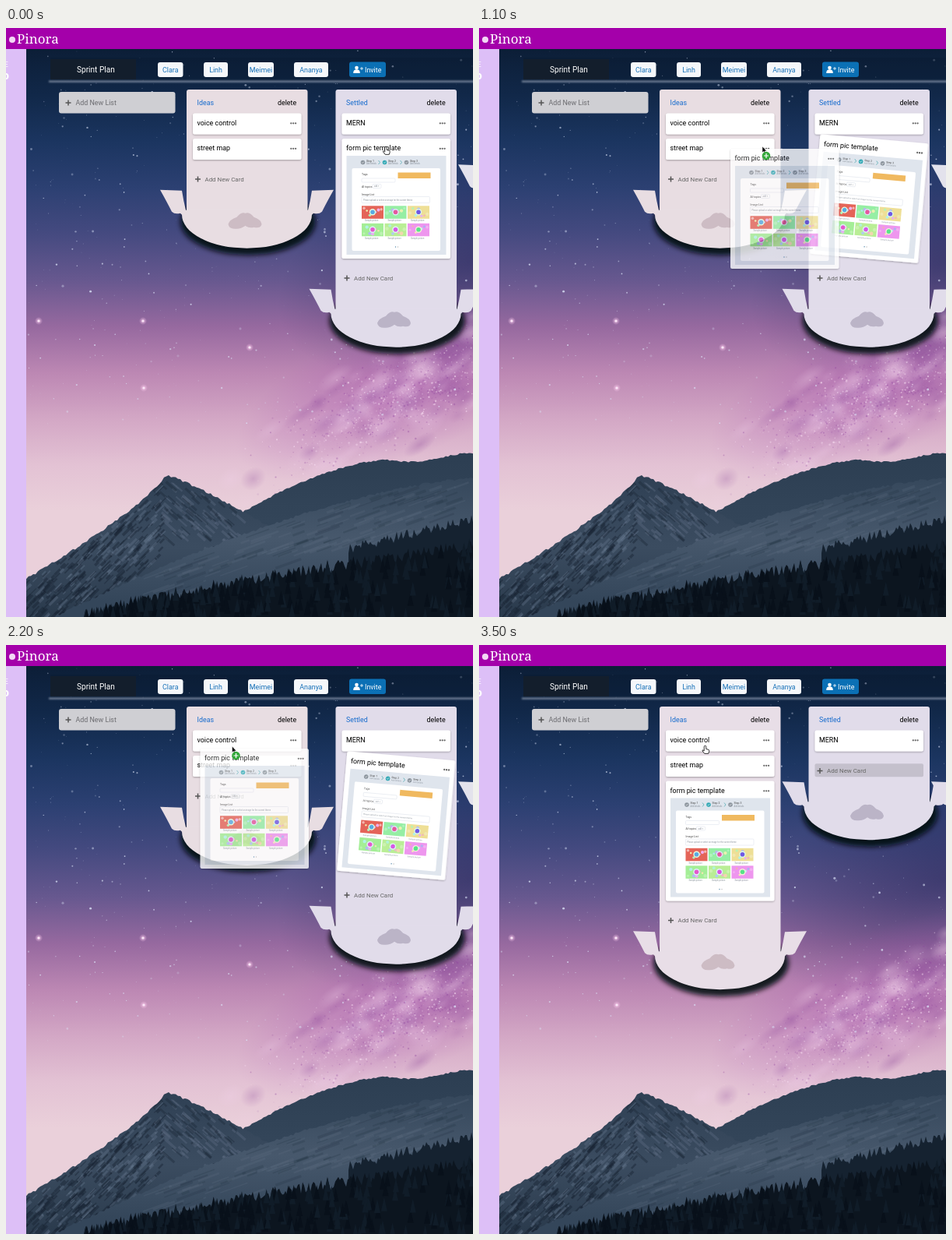
Animation of 600 by 756 pixels, one loop 3700 ms. Source, as an HTML page with a canvas:

```html
<!DOCTYPE html>
<html lang="en">
<head>
<meta charset="utf-8">
<title>Sprint board</title>
<style>
html, body { margin: 0; width: 600px; height: 756px; overflow: hidden; }
canvas, svg { position: absolute; left: 0; top: 0; }
text { font: 8.9px Roboto, Arial, sans-serif; }
.tiny { font-size: 2.6px; fill: #8a929c; }
.label { font-size: 3.5px; fill: #444; }
.add { font-size: 7.9px; fill: #666; }
.name { fill: #1670b8; text-anchor: middle; }
.light { fill: #fff; }
</style>
</head>
<body>
<canvas id="sky" width="600" height="756"></canvas>
<svg id="ui" width="600" height="756"></svg>
<script>
const c = document.getElementById('sky').getContext('2d');
const ui = document.getElementById('ui');

let seed = 11;
const rnd = () => (seed = seed * 16807 % 2147483647) / 2147483647;
const spread = () => rnd() + rnd() + rnd() - 1.5;
const repeat = (n, f) => { for (let i = 0; i < n; i++) f(i); };

function fade(y0, y1, ...colors) {
  const g = c.createLinearGradient(0, y0, 0, y1);
  colors.forEach((color, i) => g.addColorStop(i / (colors.length - 1), color));
  return g;
}

function glow(x, y, rx, ry, rgb, alpha, turn = 0) {
  c.save();
  c.translate(x, y);
  c.rotate(turn);
  c.scale(rx, ry);
  const g = c.createRadialGradient(0, 0, 0, 0, 0, 1);
  g.addColorStop(0, `rgba(${rgb},${alpha})`);
  g.addColorStop(1, `rgba(${rgb},0)`);
  c.fillStyle = g;
  c.fillRect(-1, -1, 2, 2);
  c.restore();
}

function dot(x, y, r, color) {
  c.fillStyle = color;
  c.beginPath();
  c.arc(x, y, r, 0, 7);
  c.fill();
}

function paintSky() {
  c.fillStyle = fade(27, 620, '#0c1e37', '#112849', '#1b3560', '#2c4072', '#454a80',
    '#67588f', '#96699f', '#bc87b3', '#d3a7c5', '#e3c2d4', '#ead0da');
  c.fillRect(0, 0, 600, 756);
  glow(600, 300, 260, 140, '34,36,86', .5, -.3);
  glow(510, 460, 230, 90, '170,88,178', .5, -.4);

  // Milky way: overlapping puffs, then grains, along one slanted band
  const band = () => {
    const along = spread() * 160;
    return [520 + along, 465 - along * .45 + spread() * 60];
  };
  repeat(130, i => glow(...band(), 10 + rnd() * 26, 6 + rnd() * 12, i % 3 ? '240,208,232' : '138,68,152', .12 + rnd() * .2, -.6));
  repeat(1300, i => dot(...band(), .4 + rnd() * .9, i % 2 ? `rgba(252,228,246,${rnd() * .6})` : `rgba(142,66,158,${rnd() * .4})`));

  repeat(520, () => dot(26 + rnd() * 574, 28 + rnd() * 480, .3 + rnd() ** 3 * 1.3, `rgba(220,228,248,${.2 + rnd() * .6})`));
  [[42, 376], [176, 376], [177, 462], [313, 410]].forEach(([x, y]) => {
    glow(x, y, 5, 5, '255,205,240', .8);
    dot(x, y, 1.6, '#fbe6f8');
  });
}

const peak = x => 574 + (x < 205 ? 133 * ((205 - x) / 179) ** .8 : 46 * ((x - 205) / 98) ** 1.2);
const range = x => 554 + 68 * (Math.max(0, 490 - x) / 187) ** 1.6 - Math.max(0, x - 490) * .04 + (x > 490 ? 4 * Math.sin((x - 490) / 22) : 0);
const slope = x => 578 + 112 * ((600 - x) / 395) ** 1.5;
const grove = x => 668 - 38 * ((x - 440) / 160);
const forest = x => 760 - 96 * ((x - 95) / 505) ** .75;

function ridge(f, from, jag, fill, step = 3) {
  c.fillStyle = fill;
  c.beginPath();
  c.moveTo(from, 756);
  for (let x = from; x < 603; x += step) c.lineTo(x, f(x) - (rnd() - .5) * jag);
  c.lineTo(603, 756);
  c.fill();
}

// Short streaks running downhill, as rock and snow
function streaks(n, f, x0, x1, depth, lean, color) {
  repeat(n, () => {
    const x = x0 + rnd() * (x1 - x0), y = f(x) + 3 + rnd() * depth, len = 4 + rnd() * 13;
    c.strokeStyle = color(x);
    c.lineWidth = 1 + rnd() * 3;
    c.beginPath();
    c.moveTo(x, y);
    c.lineTo(x + lean(x) * len, y + len * .8);
    c.stroke();
  });
}

function paintLand() {
  ridge(range, 295, 2, fade(545, 720, '#2c3e52', '#334559', '#27384a'));
  ridge(peak, 26, 3, fade(574, 756, '#2f4054', '#3b4c60', '#2a3a4c'));
  streaks(420, peak, 26, 205, 90, () => -.8, () => rnd() < .65 ? 'rgba(24,36,52,.45)' : 'rgba(104,120,142,.35)');
  streaks(130, peak, 195, 300, 70, () => .9, () => rnd() < .5 ? 'rgba(28,40,56,.4)' : 'rgba(96,112,134,.35)');
  ridge(slope, 60, 3, fade(575, 735, '#35475b', '#47586c', '#34465a'));
  streaks(160, slope, 200, 600, 60, () => -2.2, () => rnd() < .5 ? 'rgba(34,48,64,.22)' : 'rgba(100,116,136,.2)');
  ridge(grove, 440, 14, '#152230', 2);
  ridge(forest, 95, 16, '#0c151f', 2);
  repeat(240, i => {
    const x = 100 + rnd() * 500, y = forest(x) + rnd() * (756 - forest(x));
    c.fillStyle = i % 2 ? '#101c28' : '#08101a';
    c.beginPath();
    c.moveTo(x, y - 10);
    c.lineTo(x + 4, y + 8);
    c.lineTo(x - 4, y + 8);
    c.fill();
  });
}

const text = (x, y, s, attrs = '') => `<text x="${x}" y="${y}" ${attrs}>${s}</text>`;
const rect = (x, y, w, h, fill, attrs = '') => `<rect x="${x}" y="${y}" width="${w}" height="${h}" fill="${fill}" ${attrs}/>`;
const circle = (x, y, r, fill) => `<circle cx="${x}" cy="${y}" r="${r}" fill="${fill}"/>`;
const at = (x, y, body) => `<g transform="translate(${x} ${y})">${body}</g>`;
const plus = (x, y) => `<path d="M${x} ${y}h7m-3.5-3.5v7" stroke="#555" stroke-width="1.5"/>`;

function tile(hue, i) {
  const tone = (turn, light) => `hsl(${hue + turn} 72% ${light}%)`;
  let art = rect(0, 0, 28, 16.5, tone(0, hue < 20 ? 62 : 76));
  repeat(7, k => art += circle(3 + k * 3.7, 3 + rnd() * 10.5, 1.2 + rnd() * 1.2, tone(k * 60, 82)));
  art += circle(14, 8, 4.2, tone(90, 92)) + circle(14, 8, 2.8, tone(200, 62));
  return at(25.5 + i % 3 * 29.5, 86.3 + Math.floor(i / 3) * 22.5, art + text(4, 20, 'Sample picture', 'class="tiny"'));
}

function form() {
  const step = i => at(27 + i * 28, 30.5, circle(0, 0, 2.8, i === 1 ? '#35a9b5' : '#8c959e') +
    '<path d="M-1.3 0l1 1 1.7-2" fill="none" stroke="#fff" stroke-width=".6"/>' +
    text(4.5, -.7, 'Step ' + (i + 1), 'class="label"') + text(4.5, 2.5, 'Add details', 'class="tiny"') +
    (i < 2 ? '<path d="M20-2.5l2 2.5-2 2.5" fill="none" stroke="#57adb5" stroke-width=".8"/>' : ''));
  const label = (y, s) => text(25.5, y, s, 'class="label"');
  const field = (x, y, w, h, s) => rect(x, y, w, h, '#fff', 'stroke="#d8dfe8" stroke-width=".5" rx="1"') + text(x + 2, y + h / 2 + 1, s, 'class="tiny"');
  return rect(6, 22, 128, 127, '#dfe5ed') + [0, 1, 2].map(step).join('') +
    rect(13, 38, 113.5, 106, '#fff', 'rx="2"') + rect(72, 43.5, 42, 7.5, '#f0b95f') +
    label(47, 'Tags') + label(62.5, 'AI topics') + label(72.5, 'Image List') +
    field(25.5, 51, 43, 5, '') + field(39.5, 58.5, 11, 5, 'add +') +
    field(25.5, 74.5, 87.5, 8, 'Please upload or select an image for the current theme') +
    [5, 130, 50, 110, 95, 300].map(tile).join('') + circle(69, 139, .7, '#58a') + circle(72, 139, .7, '#bbb');
}

const SHORT = 27, TALL = 154, GAP = 5.5;

function card(title, pic) {
  return rect(0, 0, 139.5, pic ? TALL : SHORT, '#fff', 'rx="2.5" filter="url(#lift)"') + text(5.5, 15, title) +
    [0, 1, 2].map(i => circle(126.3 + i * 2.9, 12.8, 1.15, '#666')).join('') + (pic ? form() : '');
}

const picCard = card('form pic template', true);
const beard = 'M-22 14Q-20 8-11 5Q-5-2 0 0Q5-2 11 5Q20 8 21 14Q20 20 11 18Q5 20 0 16Q-5 20-11 20Q-21 21-22 14Z';
const hull = 'M-34 0L-6 1Q-4 14-1 26H156Q159 14 161 1L189 0Q180 16 174 28Q170 32 163 30L161 32A83.5 43 0 0 1-6 32L-8 30Q-15 32-19 28Q-25 16-34 0Z';

// items: [height, svg] of each card
function list(x, title, items, fill, mark, hover) {
  let y = 109.5, cards = '';
  for (const [h, body] of items) {
    cards += at(8, y, body);
    y += h + GAP;
  }
  const w = y + 33.2;
  return at(x, 0,
    at(0, w, '<ellipse cx="79" cy="41" rx="87" ry="43" fill="#05070f" opacity=".88" filter="url(#blur)"/>') +
    rect(0, 79, 155.5, w - 45, fill, 'rx="3"') +
    at(0, w, `<path d="${hull}" fill="${fill}"/>`) + at(75.5, w + 30, `<path d="${beard}" fill="${mark}"/>`) +
    text(13.5, 99, title, 'fill="#176ccd"') + text(117, 98.5, 'delete') +
    (hover ? rect(8, w - 23, 139.5, 17, '#000', 'opacity=".13" rx="2"') : '') +
    plus(11, w - 13.8) + text(23.5, w - 11, 'Add New Card', 'class="add"') + cards);
}

function board(state) {
  const plain = s => [SHORT, card(s)];
  const pic = [TALL, state === 'tilt' ? `<g transform="rotate(5 69.75 77)">${picCard}</g>` : picCard];
  const done = state === 'done';
  const ideas = [plain('voice control'), plain('street map')], settled = [plain('MERN')];
  (done ? ideas : settled).push(pic);
  return `<g id="${state}">` + list(615, '', [plain('')], '#e3e2ec', '#bbb') +
    list(232, 'Ideas', ideas, done ? '#e8dee7' : '#e8dde2', '#cdbcc4') +
    list(423.5, 'Settled', settled, '#e1dcea', '#bbb4c7', done) + '</g>';
}

function chrome() {
  const person = (name, x, w) => rect(x, 44, w, 19, '#f5f7fa', 'rx="3"') + text(x + w / 2, 56.5, name, 'class="name"');
  return rect(0, 27, 26, 729, '#ddbff7') + rect(0, 0, 600, 27, '#a400aa') + circle(8, 15, 4, '#f3d8f5') +
    text(14, 19.5, 'Pinora', 'class="light" style="font:17px \'Noto Serif\',serif"') +
    text(-2.2, 50, 'E', 'class="light"') + text(-4, 66, 'o', 'class="light" style="font-size:14px;font-weight:900"') +
    rect(57, 38, 543, 30, '#08172c', 'opacity=".3"') + rect(57, 40, 110, 26, '#131e2c') +
    rect(55, 67.8, 560, 1.6, '#bcc6d6', 'opacity=".85" filter="url(#soft)"') +
    text(91, 56.5, 'Sprint Plan', 'class="light" style="font-size:10.1px"') +
    person('Clara', 195, 32.5) + person('Linh', 254, 31) + person('Meimei', 311, 33) + person('Ananya', 370, 44) +
    rect(441, 43.5, 47, 19.5, '#0b70b5', 'rx="3"') + text(461, 56.5, 'Invite', 'class="light"') +
    circle(450.5, 51, 2.3, '#fff') + '<path d="M446.5 57.5q0-4 4-4t4 4zM455 52h4m-2-2v4" fill="#fff" stroke="#fff" stroke-width=".8"/>' +
    rect(68, 82, 149.5, 27.5, '#cfcfd3', 'rx="3"') + plus(76.5, 96) + text(89.5, 99, 'Add New List', 'fill="#6c6c70"');
}

const blur = (id, r) => `<filter id="${id}" x="-20%" y="-200%" width="140%" height="500%"><feGaussianBlur stdDeviation="${r}"/></filter>`;

ui.innerHTML = `<defs>${blur('blur', 3)}${blur('soft', .8)}
  <filter id="lift" x="-5%" y="-15%" width="110%" height="140%"><feDropShadow dx="0" dy="1" stdDeviation="1" flood-opacity=".3"/></filter></defs>` +
  chrome() + board('rest') + board('tilt') + board('done') +
  `<g id="ghost" opacity=".8">${picCard}</g>
  <g id="hand"><path transform="scale(.85)" d="M-1.5 1Q-1.5-1 0-1T1.5 1V4L5.5 5.2Q6.5 5.7 6 8L5 11H-1L-4 7Q-4.6 5.5-3 5.7L-1.5 7Z" fill="#fff" stroke="#111"/></g>
  <g id="arrow"><path d="M0 0V8L1.8 6.3L3.2 9.5L4.5 9L3.1 5.9H5.5Z" stroke="#fff" stroke-width=".5"/>
    <g id="badge">${circle(5, 12, 5.3, '#35a83c')}<path d="M2 12h6m-3-3v6" stroke="#fff" stroke-width="1.2"/></g></g>`;

paintSky();
paintLand();

const LOOP = 3700, GRAB = 700, RELEASE = 2600, DROP = 3100;
const path = [[600, 488, 153], [1100, 364, 152], [1500, 325, 143], [2100, 290.5, 130]];

function pointer(t) {
  const i = path.findIndex(p => p[0] > t);
  const [t1, x1, y1] = path.at(i), [t0, x0, y0] = path.at(i - 1);
  const k = i > 0 ? (t - t0) / (t1 - t0) : 1;
  return [x0 + (x1 - x0) * k, y0 + (y1 - y0) * k];
}

const el = id => document.getElementById(id);
const show = (id, on) => el(id).style.display = on ? '' : 'none';
const move = (id, x, y) => el(id).setAttribute('transform', `translate(${x} ${y})`);

function draw(now) {
  const t = Math.floor(now % LOOP / 100) * 100;
  const [x, y] = pointer(t);
  const dragging = t >= GRAB && t < RELEASE, held = t >= GRAB && t < DROP;
  show('rest', t < GRAB);
  show('tilt', held);
  show('done', t >= DROP);
  show('ghost', dragging);
  show('badge', dragging);
  show('arrow', held);
  show('hand', !held);
  move('ghost', x - 41, y + 3);
  move('arrow', x, y);
  move('hand', x, y);
}

const start = performance.now();
(function tick() {
  draw(performance.now() - start);
  requestAnimationFrame(tick);
})();
</script>
</body>
</html>
```
